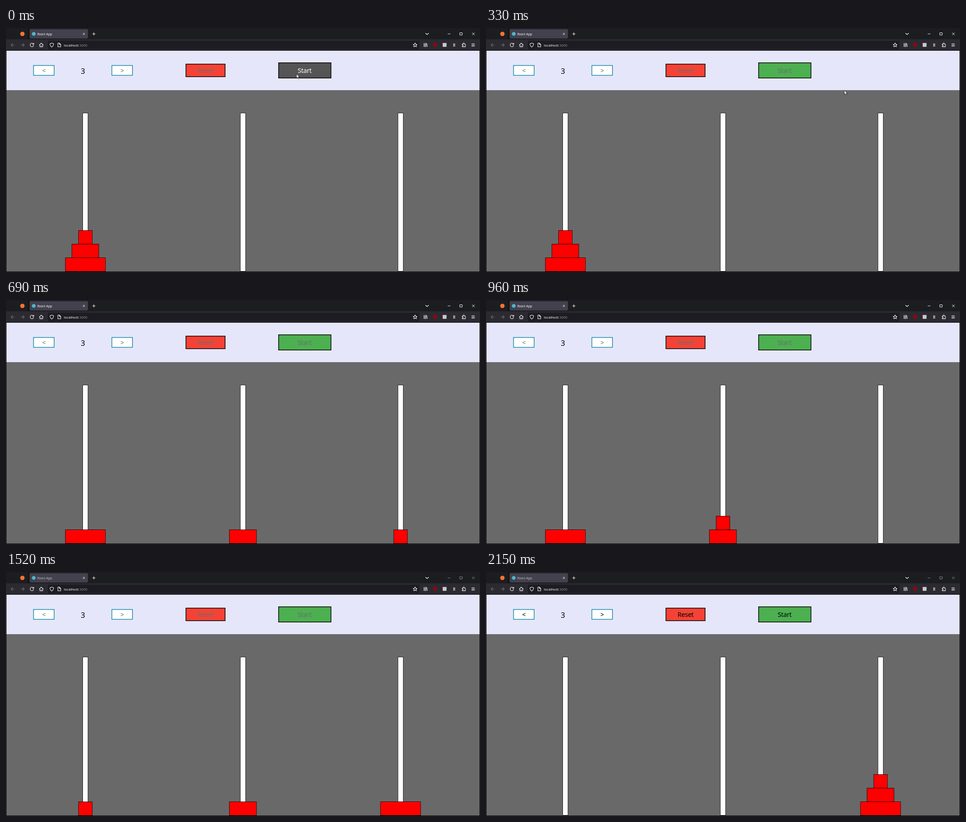
Animation, 1041 px wide and 538 px high, one loop 3.09 s. Source, as an HTML page:

```html
<!DOCTYPE html>
<html lang="en">
<head>
<meta charset="utf-8">
<title>Towers</title>
<style>
html, body { margin: 0; width: 100%; height: 100%; overflow: hidden; background: #000; }
svg { display: block; width: 100%; height: 100%; }
text { font-family: "Noto Sans", "Open Sans", sans-serif; }

.icon { fill: none; stroke: #f4f4f8; stroke-width: 1.1; stroke-linecap: round; stroke-linejoin: round; }
.faint { stroke: #6c6b74; }
.label { font-size: 14.2px; letter-spacing: -.3px; text-anchor: middle; fill: #6d6d6d; }
.edge { stroke: #000; stroke-width: 1.5; }
.arrow { fill: #fff; stroke: #178ba6; stroke-width: 1.5; }
.peg { fill: #fff; stroke: #000; stroke-width: .8; }
.disk { fill: #f00; stroke: #000; stroke-width: .8; }

.label, .disk, #start, #startLabel, #pointer, #tabTitle, #windowButtons {
  animation: 3090ms step-end infinite;
}
.label { animation-name: enable; }
#start { animation-name: startFill; }
#startLabel { animation-name: startText; }
#pointer { animation-name: point; }
#tabTitle { animation-name: blurTitle; }
#windowButtons { animation-name: blurButtons; }
#small { animation-name: small; }
#medium { animation-name: medium; }
#large { animation-name: large; }

@keyframes enable { 0% { fill: #6d6d6d; } 69.57%, 100% { fill: #000; } }
@keyframes startFill { 0% { fill: #555; } 8.09%, 100% { fill: #4caf50; } }
@keyframes startText { 0% { fill: #fff; } 8.09% { fill: #6d6d6d; } 69.57%, 100% { fill: #000; } }
@keyframes point {
  0% { transform: translate(638px, 101.5px); }
  8.09% { transform: translate(677px, 112px); }
  10.67% { transform: translate(787px, 137.5px); }
  12.94% { transform: translate(1006px, 190px); }
  15.85%, 100% { transform: translate(1100px, 212px); }
}
@keyframes blurTitle { 0% { opacity: 1; } 36.89%, 100% { opacity: .68; } }
@keyframes blurButtons { 0% { opacity: 1; } 36.89%, 100% { opacity: .5; } }
@keyframes small {
  0% { transform: none; }
  15.85% { transform: translate(692.2px, 60.2px); }
  31.06% { transform: translate(346.1px, 30.1px); }
  49.19% { transform: translate(0, 60.2px); }
  69.57%, 100% { transform: translate(692.2px, 0); }
}
@keyframes medium {
  0% { transform: none; }
  22.33% { transform: translate(346.1px, 30.1px); }
  59.22%, 100% { transform: translate(692.2px, 0); }
}
@keyframes large { 0% { transform: none; } 40.12%, 100% { transform: translate(692.2px, 0); } }
</style>
</head>
<body>
<svg viewBox="0 0 1041 538" preserveAspectRatio="none">
  <!-- Browser tabs -->
  <rect width="1041" height="26" fill="#1c1d21"/>
  <circle cx="36" cy="13" r="4.8" fill="#f5762f"/>
  <path d="M49.5 0V25" stroke="#08080a"/>
  <rect x="52" y="2.5" width="128" height="20.5" rx="2" fill="#42414d"/>
  <circle cx="61" cy="13" r="4" fill="#4fb4d0"/>
  <text id="tabTitle" x="68.7" y="15.6" font-size="6.9" fill="#fbfbfe">React App</text>
  <g class="icon">
    <path d="M169 11l4 4m0-4l-4 4" stroke-width=".9"/>
    <path d="M190 13h6m-3-3v6"/>
    <path d="M921.5 11.5l3.3 3 3.3-3"/>
    <path id="windowButtons" d="M970.5 13h5M997 10.5h5v5h-5zM1024 10.5l5 5m0-5l-5 5" stroke-width="1"/>
  </g>

  <!-- Toolbar -->
  <rect y="25" width="1041" height="24" fill="#2b2a31"/>
  <rect x="92" y="28" width="816" height="19" rx="2" fill="#1c1c22"/>
  <g class="icon">
    <path class="faint" d="M19 37.5h-8m3.5-3.5l-3.5 3.5 3.5 3.5M32 37.5h8m-3.5-3.5l3.5 3.5-3.5 3.5"/>
    <path d="M60.3 35.5a3.9 3.9 0 1 0 .4 3M61 33.3v2.7h-2.7"/>
    <path d="M73.2 37.3l4.3-4 4.3 4M74.4 36.5v5h6.2v-5M77.5 41.5v-2.5"/>
    <path d="M100.5 33.2l3.8 1.4q.3 5-3.8 7.4-4.1-2.4-3.8-7.4z"/>
    <path d="M114 33.4h3.5l2.7 2.7v5.4H114zM117.4 33.6v2.7h2.6"/>
    <path d="M898.5 33l1.3 2.9 3.1.3-2.3 2.1.7 3.1-2.8-1.6-2.8 1.6.7-3.1-2.3-2.1 3.1-.3z"/>
    <path d="M918 33.7v7.5M920.3 33.7v7.5M922.5 33.7v7.5M924 34l1.3 7"/>
    <path d="M1002 35.3h2v-1a1.2 1.2 0 0 1 2.4 0v1h2.4v6.1H1002v-2.1h1a1.1 1.1 0 0 0 0-2.2h-1z"/>
    <path d="M1022.8 34.7h6.2M1022.8 37.3h6.2M1022.8 39.9h6.2"/>
  </g>
  <circle cx="942.3" cy="37.2" r="4.6" fill="#8c0710"/>
  <rect x="959" y="33" width="8.5" height="8.5" fill="#c9c9cd"/>
  <rect x="982" y="34" width="4.5" height="7" fill="#aa8b83"/>
  <text x="127" y="40.5" font-size="7.6" fill="#fbfbfe">localhost<tspan fill="#8f8e98">:3000</tspan></text>

  <!-- Page -->
  <rect x="1" y="50" width="1039" height="87.5" fill="#e6e6fa"/>
  <rect x="1" y="138" width="1039" height="399" fill="#696969"/>
  <rect class="arrow" x="60.5" y="82.6" width="45.2" height="21.8"/>
  <rect class="arrow" x="232.5" y="82.6" width="45.2" height="21.8"/>
  <rect class="edge" x="395.2" y="79.6" width="86" height="27.8" fill="#f44336"/>
  <rect class="edge" id="start" x="598.7" y="76.7" width="115" height="33.6"/>
  <text class="label" x="83.2" y="99.2">&lt;</text>
  <text class="label" x="255.2" y="99.2">&gt;</text>
  <text class="label" x="438.3" y="99.4">Reset</text>
  <text class="label" id="startLabel" x="656" y="99.4">Start</text>
  <text x="169" y="100.6" font-size="16.5" text-anchor="middle">3</text>

  <rect class="peg" x="168.6" y="187.4" width="11.4" height="349.2"/>
  <rect class="peg" x="514.7" y="187.4" width="11.4" height="349.2"/>
  <rect class="peg" x="860.9" y="187.4" width="11.4" height="349.2"/>
  <rect class="disk" id="large" x="130.3" y="506.6" width="88" height="30"/>
  <rect class="disk" id="medium" x="144.7" y="476.5" width="59.2" height="30"/>
  <rect class="disk" id="small" x="159.3" y="446.4" width="30" height="30"/>

  <path id="pointer" d="M0 0v9l2.1-1.9 1.5 3.3 1.6-.7-1.5-3.2h2.8z" fill="#fff" stroke="#000" stroke-width=".7"/>
</svg>
</body>
</html>
```
